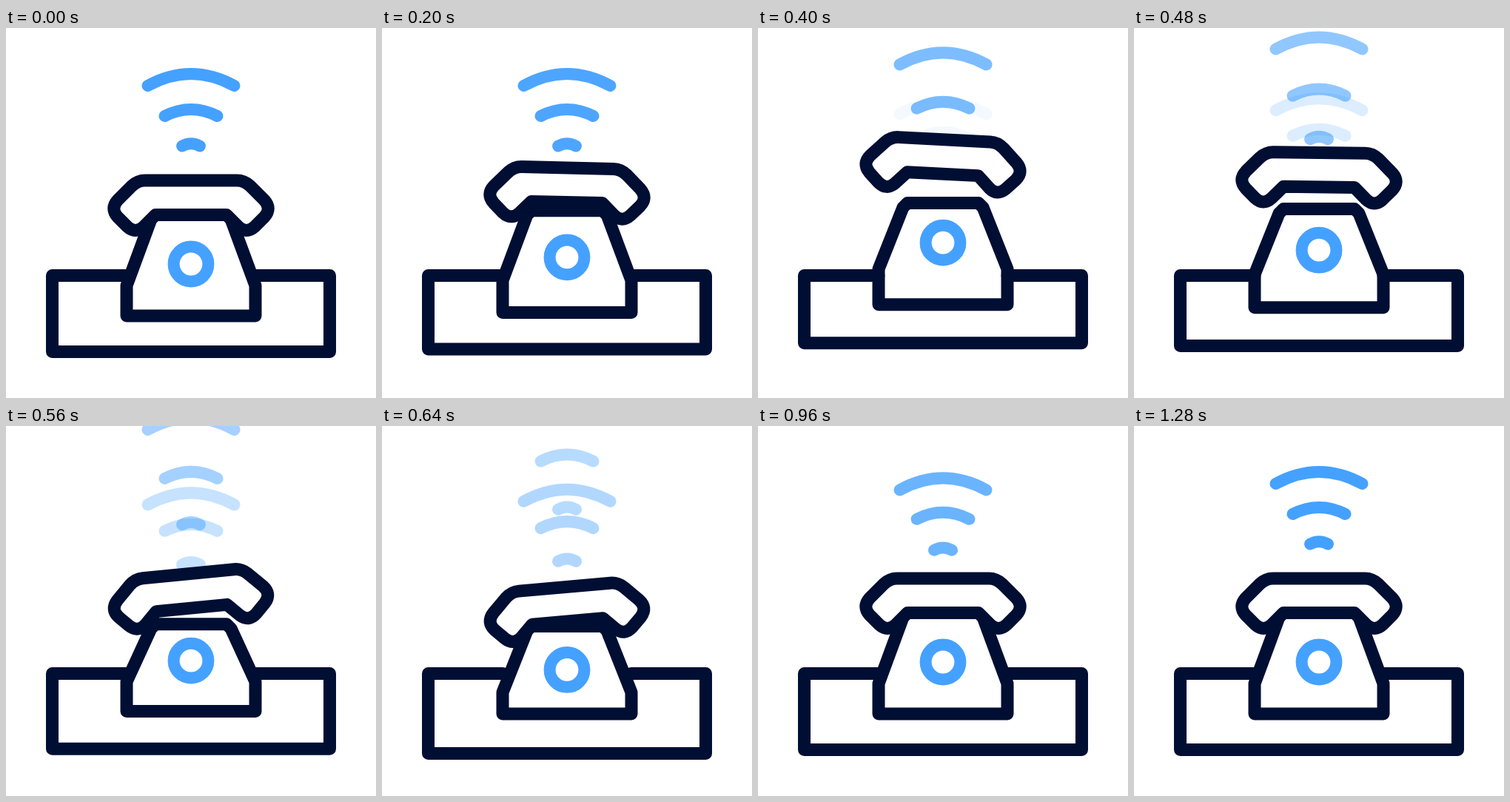
An HTML page that plays this animation: 500x500 px, repeating every 1.48 s.

```html
<!DOCTYPE html>
<html lang="en">
<head>
<meta charset="utf-8">
<title>Ringing telephone</title>
<style>
  html, body { margin: 0; width: 100%; height: 100%; overflow: hidden; background: #fff; }
  svg { display: block; width: 100%; height: 100%; }
  path, circle { fill: none; stroke-width: 17; stroke-linecap: round; stroke-linejoin: round; }
  .dark { stroke: #000e33; }
  .blue { stroke: #45a1ff; stroke-width: 16; }
  #handset { fill: #fff; }
</style>
</head>
<body>
<svg viewBox="0 0 500 500">
  <g id="waves"></g>
  <path id="base" class="dark"/>
  <path id="body" class="dark"/>
  <circle id="dial" class="blue" cx="250" r="23.4"/>
  <path id="handset" class="dark" d="M188 206H312Q322 206 330 213.5L349 232.5Q359.5 244 349 255.5L336 268.5Q325 278.5 314 268.5L298 252.5H202L186 268.5Q175 278.5 164 268.5L151 255.5Q140.5 244 151 232.5L170 213.5Q178 206 188 206Z"/>
</svg>
<script>
const LOOP = 1480, STEP = 40;
const LEAP = 160, SETTLE = 825;      // the phone leaves and regains its rest pose
const FADE_OUT = 800;                // duration for waves that fly off
const ENTER = 360, ARRIVED = 1280;   // replacement waves

const el = id => document.getElementById(id);
const progress = (t, from, to) => Math.min(1, Math.max(0, (t - from) / (to - from)));

// Jump up by `rise`, come down at `land`, then sink by `dip` and settle
function bounce(t, rise, dip, land = 575) {
  const jump = Math.sin(Math.PI * progress(t, LEAP, land));
  const sink = Math.sin(Math.PI * Math.sqrt(progress(t, land, SETTLE)));
  return dip * sink - rise * jump;
}

function addArc(d) {
  const p = document.createElementNS("http://www.w3.org/2000/svg", "path");
  p.setAttribute("d", d);
  p.setAttribute("class", "blue");
  return el("waves").appendChild(p);
}

const arc = (half, y, bend, below) => {
  const d = `M${250 - half} ${y}Q250 ${y - bend} ${250 + half} ${y}`;
  return { below, leaving: addArc(d), arriving: addArc(d) };
};
const arcs = [arc(58.5, 78, 32, 41), arc(35.5, 119, 18, 33), arc(12, 159.5, 6.5, 40)];

function place(node, y, alpha) {
  node.setAttribute("transform", `translate(0 ${y})`);
  node.setAttribute("opacity", alpha);
}

function drawPhone(t) {
  const top = 252.5 + bounce(t, 17.8, 19, 535);
  const side = 348 + bounce(t, 23, 12);
  const foot = 389 + bounce(t, 15.6, 0, 590);
  const floor = 437.5 + bounce(t, 12, 5);
  const lift = bounce(t, 57, 11.5);
  const tilt = bounce(t, -3.6, -5.7, 502);

  el("body").setAttribute("d",
    `M202 ${top}H298L304 ${top + 6}L337 ${side}V${foot}H163V${side}L196 ${top + 6}Z`);
  el("base").setAttribute("d", `M163 334.5H62.5V${floor}H437.5V334.5H337`);
  el("dial").setAttribute("cy", 319 + bounce(t, 30, 10.5, 568));
  el("handset").setAttribute("transform", `translate(0 ${lift}) rotate(${tilt} 250 244)`);
}

function drawWaves(t) {
  const gone = progress(t, LEAP, LEAP + FADE_OUT - 20);
  const missing = (1 - progress(t, ENTER, ARRIVED)) ** 1.5;
  arcs.forEach(({ below, leaving, arriving }, i) => {
    const flight = Math.max(0, t - 240 - 85 * i);
    place(leaving, -((0.075 * flight) ** 1.35), 1 - gone);
    place(arriving, below * missing, 1 - missing);
  });
}

const start = performance.now();
function tick() {
  const elapsed = (performance.now() - start) % LOOP;
  const t = Math.floor(elapsed / STEP) * STEP;
  drawPhone(t);
  drawWaves(t);
  requestAnimationFrame(tick);
}
tick();
</script>
</body>
</html>
```
